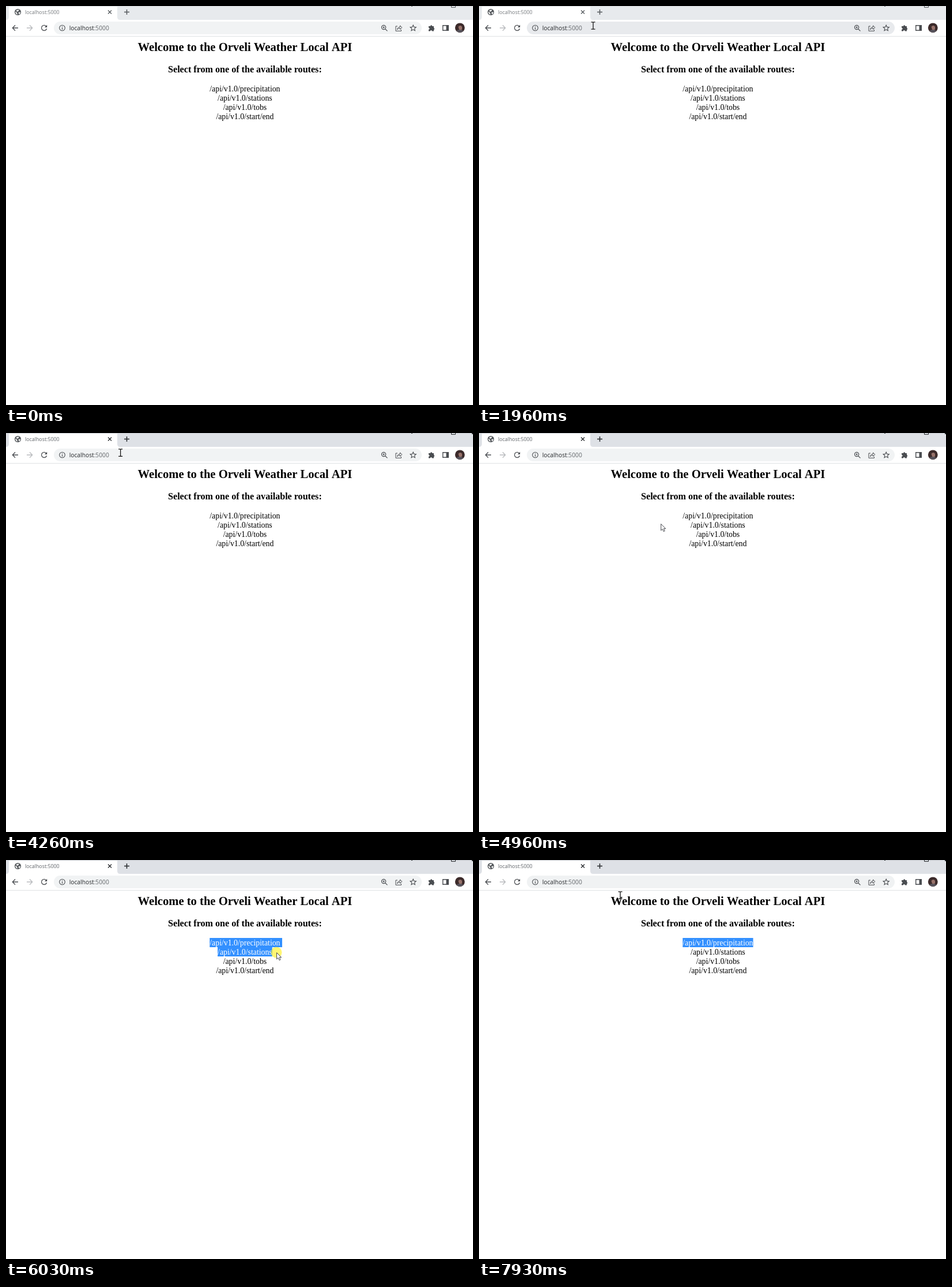
These frames come from a looping animation (810 by 691 pixels, 8 s). An HTML page with a canvas:

```html
<!DOCTYPE html>
<html lang="en">
<head>
<meta charset="utf-8">
<title>Local API in a browser</title>
<style>
html, body { margin: 0; width: 100%; height: 100%; overflow: hidden; background: #fff; }
canvas { display: block; }
</style>
</head>
<body>
<canvas id="stage" width="810" height="691"></canvas>
<script>
const ctx = document.getElementById('stage').getContext('2d');
const LOOP = 8000;
const SERIF = '"Liberation Serif", serif';
const SANS = '"Open Sans", sans-serif';
const CENTER = 414.4;
const INK = '#4a4d51';

const lines = [
  ['Welcome to the Orveli Weather Local API', 78, 'bold 20.6px '],
  ['Select from one of the available routes:', 115, 'bold 16.1px '],
  ['/api/v1.0/precipitation', 147.5, '13.8px '],
  ['/api/v1.0/stations', 163.5, '13.8px '],
  ['/api/v1.0/tobs', 179.5, '13.8px '],
  ['/api/v1.0/start/end', 195.5, '13.8px ']
].map(([text, y, font]) => {
  ctx.font = font + SERIF;
  const width = ctx.measureText(text).width;
  const size = parseFloat(font.match(/[\d.]+(?=px)/));
  return { text, y, font: ctx.font, width, x: CENTER - width / 2, top: y - size * 0.9, bottom: y + size * 0.25 };
});

// Tracks are lists of [time, value...], read by linear interpolation.
const pointer = [
  [240, 757, 664], [600, 480, 290], [850, 345, 110], [1000, 301, 57], [1070, 300, 57],
  [1400, 235, 52], [1820, 204, 44], [1890, 199, 37], [1960, 198, 34],
  [4190, 198, 34], [4260, 198.5, 34], [4500, 225, 70], [4650, 262, 118], [4800, 295, 150],
  [4960, 315, 157], [5030, 328, 155], [5230, 353, 143], [5430, 353, 143],
  [5700, 395, 146], [5900, 445, 154], [6030, 469, 160], [6230, 477, 159],
  [6290, 479, 150], [6500, 480.5, 145.5], [7100, 480.5, 145.5], [7240, 465, 167],
  [7500, 350, 130], [7720, 262, 70], [7860, 249, 42], [7930, 245, 61]
];
const hover = [
  [1780, 0], [1930, 1], [3449, 1], [3450, 0], [4260, 0], [4340, 1], [4420, 1], [4600, 0],
  [7790, 0], [7870, 0.6], [7930, 0.1]
];

function at(track, t) {
  const next = track.findIndex(key => key[0] > t);
  if (next === 0) return track[0].slice(1);
  if (next < 0) return track[track.length - 1].slice(1);
  const a = track[next - 1], b = track[next];
  const k = (t - a[0]) / (b[0] - a[0]);
  return a.slice(1).map((v, i) => v + (b[i + 1] - v) * k);
}

const within = (t, from, to) => t >= from && t < to;

function rect(x, y, w, h, color) {
  ctx.fillStyle = color;
  ctx.fillRect(x, y, w, h);
}

function disc(x, y, r, color) {
  ctx.fillStyle = color;
  ctx.beginPath();
  ctx.arc(x, y, r, 0, 7);
  ctx.fill();
}

function stroke(d, color = INK, width = 1.3) {
  ctx.strokeStyle = color;
  ctx.lineWidth = width;
  ctx.stroke(new Path2D(d));
}

function fill(d, color) {
  ctx.fillStyle = color;
  ctx.fill(new Path2D(d));
}

function label(text, x, y, font, color) {
  ctx.font = font;
  ctx.fillStyle = color;
  ctx.fillText(text, x, y);
  return ctx.measureText(text).width;
}

function drawTabs(active, loading) {
  const ink = active ? '#25282b' : '#55595d';
  rect(0, 0, 810, 24, active ? '#dee1e6' : '#e7eaed');
  fill('M0 24Q5 24 5 19V1H193V19Q193 24 198 24Z', '#fff');
  rect(0, 0, 810, 1, active ? '#c8ccd1' : '#d5d8dc');
  rect(703, 0, 2, 1, ink);
  stroke('M772.5 0V2.5H779.5V0', ink, 1);
  if (active) rect(808, 0, 2, 2, ink);

  if (loading) {
    ctx.strokeStyle = '#5f6368';
    ctx.lineWidth = 1.5;
    ctx.beginPath();
    ctx.arc(20.5, 10.5, 5, -loading / 90, -loading / 90 + 4.5);
    ctx.stroke();
  } else {
    disc(20.5, 10.5, 5.6, '#54585c');
    fill('M16 9.5L19 11.5L20 15C17.5 14.5 16 12 16 9.5ZM19 6.8L22.5 6.5L22 8.5L19.5 10L17.5 8.3ZM21.5 11L25 10.5C25 12.5 24 14 22.5 14.5Z', '#f5f5f5');
  }
  label('localhost:5000', 33, 13.5, '8.85px ' + SANS, active ? '#5f6368' : '#74787c');
  stroke('M177 7.5L183 13.5M183 7.5L177 13.5', ink);
  stroke('M209.5 6V15M205 10.5H214', ink, 1.5);
}

function drawToolbar(focused, selected, loading, hoverLevel) {
  rect(0, 24, 810, 28, '#fff');
  rect(0, 52, 810, 1, '#dfe1e4');
  stroke('M21 38H11.5M16 33.3L11.3 38L16 42.7');
  stroke('M36 38H45.5M41 33.3L45.7 38L41 42.7', '#b9bbbe');
  if (loading) stroke('M62 34L70 42M70 34L62 42');
  else {
    stroke('M70 35.3A4.6 4.6 0 1 0 70.6 39.2');
    fill('M71.2 32.8V37H67Z', INK);
  }

  const shade = [241, 243, 244].map((c, i) => c + ([232, 234, 237][i] - c) * hoverLevel);
  ctx.beginPath();
  if (focused) ctx.roundRect(83, 27, 637, 21.5, 10.75);
  else ctx.roundRect(83, 27, 638, 22, 11);
  ctx.fillStyle = focused ? '#fff' : `rgb(${shade})`;
  ctx.fill();
  if (focused) {
    ctx.strokeStyle = '#1a66cc';
    ctx.lineWidth = 1.8;
    ctx.stroke();
  }

  stroke('M102.3 38A4.8 4.8 0 1 1 92.7 38A4.8 4.8 0 1 1 102.3 38M97.5 37.2V41M97.5 35V36.2', INK, 1.1);
  if (selected) rect(109.5, 30, 70, 16.5, '#9bc3f2');
  const font = '10.25px ' + SANS;
  const hostWidth = label('localhost', 109.7, 42, font, '#25282b');
  label(':5000', 109.7 + hostWidth, 42, font, selected ? '#25282b' : '#63676b');

  stroke('M658.7 37A3.6 3.6 0 1 1 651.5 37A3.6 3.6 0 1 1 658.7 37M657.7 39.7L661.5 43.4M653.4 37H656.8M655.1 35.3V38.7', INK, 1.2);
  stroke('M679 35H676V43.3H685.5V41M678.5 41C679 37.8 681 36.3 683.5 36.3V34L687 37.3L683.5 40.5V38.4C681.2 38.4 679.8 39.2 678.5 41Z', INK, 1);
  stroke('M706.2 33L707.7 36.4L711.3 36.7L708.6 39.1L709.4 42.7L706.2 40.8L703 42.7L703.8 39.1L701.1 36.7L704.7 36.4Z', INK, 1.1);
  fill('M733 35H736A1.7 1.7 0 0 1 739.4 35H742V38A1.7 1.7 0 0 1 742 41.2V43.6H739A1.6 1.6 0 0 0 735.8 43.6H733V40.8A1.6 1.6 0 0 0 733 37.6Z', INK);
  stroke('M757.7 33.7H767.3V42.3H757.7Z', INK, 1.4);
  rect(763.5, 33.5, 4, 9, INK);

  disc(787.3, 37.8, 8.4, '#3c2a2a');
  fill('M784.5 36Q788 32 791 36V40Q789 44 786 41Z', '#98736b');
  fill('M781 43Q787 39 793.5 43Q787.5 49 781 43Z', '#57545d');
}

// Nearest character edge of a line to a given x.
function snap(line, x) {
  ctx.font = line.font;
  let best = line.x;
  for (let n = 1; n <= line.text.length; n++) {
    const edge = line.x + ctx.measureText(line.text.slice(0, n)).width;
    if (Math.abs(edge - x) < Math.abs(best - x)) best = edge;
  }
  return best;
}

function drawSelection(line, right, newline = 0) {
  if (right <= line.x) return;
  ctx.save();
  ctx.beginPath();
  ctx.rect(line.x, Math.round(line.top), right - line.x + newline, 16);
  ctx.clip();
  rect(0, line.top - 2, 810, 22, '#3390ff');
  label(line.text, line.x, line.y, line.font, '#fff');
  ctx.restore();
}

function drawPage(t) {
  rect(0, 53, 810, 638, '#fff');
  for (const line of lines) label(line.text, line.x, line.y, line.font, '#000');
  if (t < 5430) return;
  const [x, y] = at(pointer, Math.min(t, 6500));
  const [first, second] = lines.slice(2);
  if (y < 151) drawSelection(first, snap(first, x));
  else {
    drawSelection(first, first.x + first.width, 3.5);
    drawSelection(second, snap(second, x));
  }
}

function drawPointer(t) {
  if (t < 240) return;
  const [x, y] = at(pointer, t);
  if (within(t, 2300, 2500) || within(t, 5430, 6900)) disc(x, y, 9.5, 'rgba(255,238,0,.55)');

  const overText = lines.some(l => x >= l.x && x <= l.x + l.width && y >= l.top && y <= l.bottom);
  const overAddress = x > 107 && x < 645 && y > 27 && y < 49;
  ctx.save();
  ctx.translate(x, y);
  if (overText || overAddress) {
    const beam = 'M-3.5 -6.2H-1Q0 -6.2 0 -5.2Q0 -6.2 1 -6.2H3.5M0 -5.5V5.5M-3.5 6.2H-1Q0 6.2 0 5.2Q0 6.2 1 6.2H3.5';
    stroke(beam, 'rgba(255,255,255,.6)', 2.4);
    stroke(beam, '#111', 1.3);
  } else {
    const arrow = 'M.5 .5V11.8L3.1 9.4L5 13.6L7 12.7L5.2 8.7H8.6Z';
    fill(arrow, '#fff');
    stroke(arrow, '#33353a', 0.9);
  }
  ctx.restore();
}

function draw(t) {
  const loading = within(t, 3450, 3780) ? t - 3449 : 0;
  drawTabs(t >= 2300, loading);
  drawToolbar(within(t, 2300, 3450), within(t, 2430, 3450), loading, at(hover, t)[0]);
  drawPage(t);
  drawPointer(t);
}

const start = performance.now();
function tick() {
  draw((performance.now() - start) % LOOP);
  requestAnimationFrame(tick);
}
tick();
</script>
</body>
</html>
```
